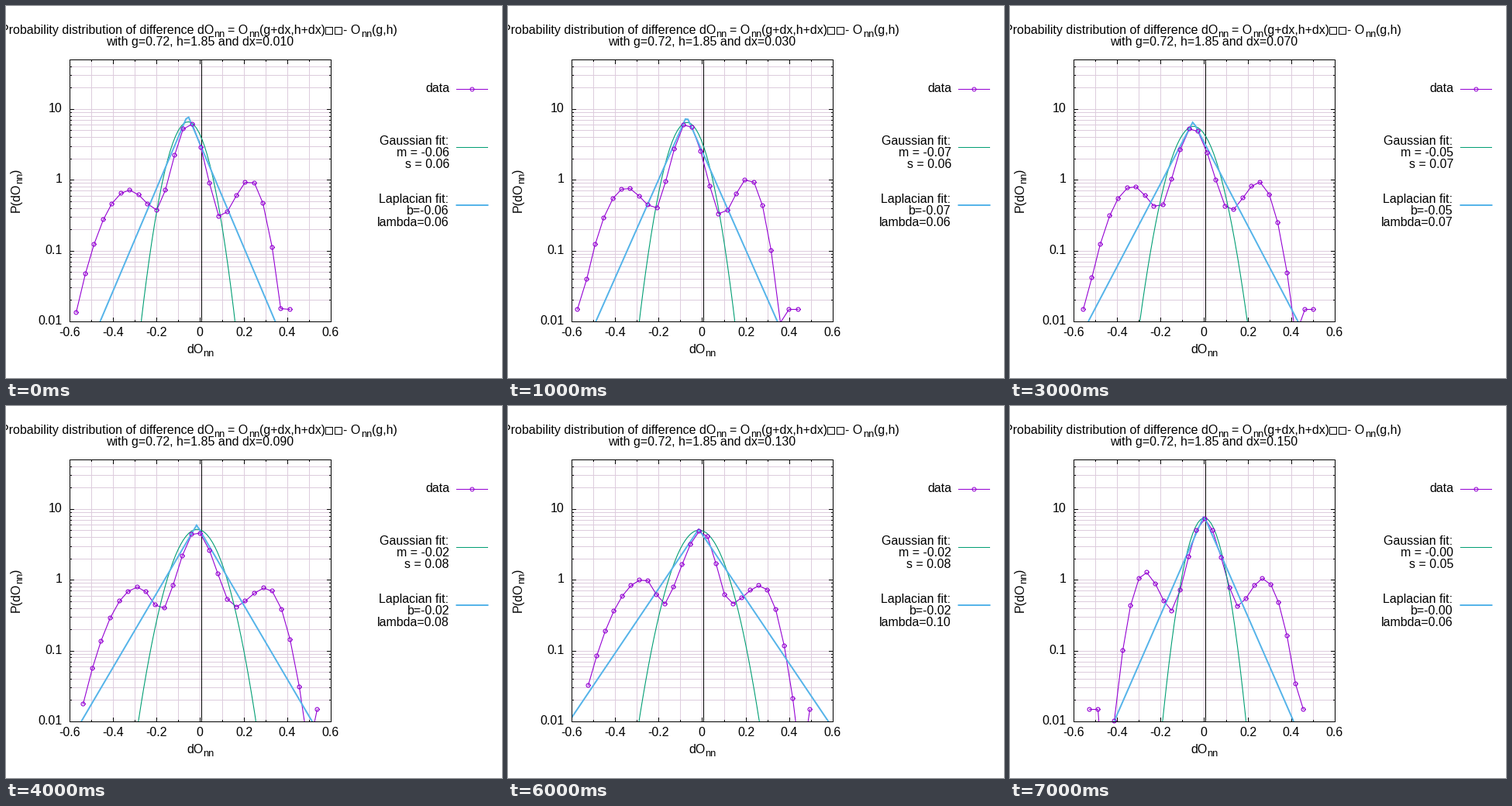
A matplotlib script for the animation above (8000 ms loop, 640 px wide and 480 px high).

```python
import numpy as np
import matplotlib.pyplot as plt
from matplotlib.animation import FuncAnimation
from matplotlib.patches import Rectangle

W, H, DPI = 640, 480, 100
LEFT, RIGHT, TOP, BOTTOM = 82, 419, 69, 407
PX = 72 / DPI
LONE = 391  # height of bins that hold a single count
PURPLE, GREEN, BLUE, GRID = "#9400d3", "#009e73", "#56b4e9", "#ddccdd"

plt.rcParams["font.family"] = "Liberation Sans"


def to_x(v):
    return LEFT + (np.asarray(v) + 0.6) * (RIGHT - LEFT) / 1.2


def to_y(p):
    scale = (BOTTOM - TOP) / np.log10(50 / 0.01)
    return BOTTOM - (np.log10(p) + 2) * scale


def fall(x, peak, low, k):
    """Drop from a peak to a low point; k = 0 is a parabola, 2 a smoothstep."""
    u = (x - peak[0]) / (low[0] - peak[0])
    return peak[1] + (low[1] - peak[1]) * u * u * (1 + k * (1 - u))


class Case:
    """fit: m, s, lambda; bins: first, step, count, lone bins left and right;
    keys: foot, peak, dip, peak, dip, peak, foot in stage pixels."""

    def __init__(self, fit, bins, keys):
        self.fit, self.bins = np.array(fit), np.array(bins)
        self.keys = np.array(keys)

    def between(self, other):
        return Case((self.fit + other.fit) / 2, (self.bins + other.bins) / 2,
                    (self.keys + other.keys) / 2)

    def points(self):
        first, step = self.bins[:2]
        count, lone_left, lone_right = np.ceil(self.bins[2:]).astype(int)
        x = np.round(first + step * np.arange(count))
        foot1, top1, dip1, top2, dip2, top3, foot2 = self.keys
        pieces = [fall(x, top1, foot1, 0), fall(x, top1, dip1, 2),
                  fall(x, top2, dip1, 1.3), fall(x, top2, dip2, 1.3),
                  fall(x, top3, dip2, 2), fall(x, top3, foot2, 0)]
        y = np.choose(np.searchsorted(self.keys[1:6, 0], x), pieces)
        y[:lone_left] = LONE
        y[count - lone_right:] = LONE
        return x, y


a = Case([-0.057, 0.0598, 0.0599], [90.3, 11.48, 25, 0, 1],
         [(90, 395), (159, 237), (196, 263), (236, 149), (275, 273),
          (314, 224), (354, 390)])
b = Case([-0.0851, 0.0622, 0.0651], [88, 11.27, 27, 1, 2],
         [(99, 373), (146, 231), (186, 261), (225, 151), (271, 271),
          (306, 219), (336, 325)])
c = Case([-0.0155, 0.0764, 0.083], [99, 11.63, 27, 0, 1],
         [(99, 384), (171, 233), (202, 264), (245, 161), (291, 260),
          (335, 234), (378, 362)])
d = Case([-0.026, 0.0528, 0.0546], [99, 10.85, 27, 2, 1],
         [(142, 317), (170, 216), (205, 266), (240, 144), (283, 265),
          (316, 224), (349, 295)])
e = Case([-0.0155, 0.0784, 0.0953], [103, 11, 27, 0, 1],
         [(110, 335), (176, 223), (202, 255), (250, 160), (284, 256),
          (326, 231), (358, 320)])
f = Case([-0.001, 0.0527, 0.0617], [102, 10.63, 27, 2, 1],
         [(134, 406), (174, 214), (210, 264), (250, 145), (292, 258),
          (326, 222), (367, 352)])
cases = [a, a.between(b), b, b.between(c), c, d, e, f]

# Whole coordinates are pixel centres.
fig = plt.figure(figsize=(W / DPI, H / DPI), dpi=DPI, facecolor="white")
ax = fig.add_axes([0, 0, 1, 1])
ax.set_xlim(-0.5, W - 0.5)
ax.set_ylim(H - 0.5, -0.5)
ax.axis("off")


def line(xs, ys, color="black", width=1, z=2):
    return ax.plot(xs, ys, color=color, lw=width * PX, zorder=z, snap=False,
                   solid_capstyle="projecting", solid_joinstyle="miter")[0]


def text(x, y, s, ha="left", size=16, rot=0):
    return ax.text(x - 0.5, y - 0.5, s, ha=ha, va="baseline",
                   fontsize=size * PX, rotation=rot, rotation_mode="anchor")


def sub(x, y, rot=0):
    text(x, y, "nn", size=12.8, rot=rot)


def rings(x, y):
    """Outline of a small circle round each point, as one broken path."""
    t = np.append(np.linspace(0, 2 * np.pi, 17), np.nan)
    return (np.add.outer(x, 2.5 * np.cos(t)).ravel(),
            np.add.outer(y, 2.5 * np.sin(t)).ravel())


def axes_box():
    for k in range(-6, 7):
        x = np.round(to_x(k / 10))
        size = 5 if k % 2 == 0 else 2
        line([x, x], [TOP, BOTTOM], GRID, z=1)
        line([x, x], [BOTTOM, BOTTOM - size])
        line([x, x], [TOP, TOP + size])
        if k % 2 == 0:
            text(x, 426, f"{k / 10:g}", "center")
    for decade in range(-2, 2):
        for k in range(1, 10):
            value = k * 10.0 ** decade
            if value > 50:
                break
            y = np.round(to_y(value))
            size = 5 if k == 1 else 2
            line([LEFT, RIGHT], [y, y], GRID, z=1)
            line([LEFT, LEFT + size], [y, y])
            line([RIGHT, RIGHT - size], [y, y])
            if k == 1:
                text(73, y + 4, f"{value:g}", "right")
    line([LEFT, RIGHT, RIGHT, LEFT, LEFT], [TOP, TOP, BOTTOM, BOTTOM, TOP], z=7)
    line([252, 252], [TOP, BOTTOM], z=3)


def captions():
    text(-7, 36, "Probability distribution of difference dO")
    text(286, 36, "= O")
    text(327, 36, "(g+dx,h+dx)")
    text(435, 36, "- O")
    text(472, 36, "(g,h)")
    for x in (268, 313, 458):
        sub(x, 40)
    for x in (412, 424):
        ax.add_patch(Rectangle((x, 27), 9, 9, fill=False, lw=PX, snap=False))
    text(233, 448, "dO")
    sub(254, 452)
    text(18, 266, "P(dO", rot=90)
    sub(21, 229, rot=90)
    text(18, 216, ")", rot=90)


def legend():
    text(572, 111, "data", "right")
    text(571, 179, "Gaussian fit:", "right")
    text(571, 254, "Laplacian fit:", "right")
    span = [581, 621]
    line(span, [107, 107], PURPLE)
    line(*rings([601], [107]), PURPLE)
    line(span, [182, 182], GREEN)
    line(span, [256.5, 256.5], BLUE, 2)


axes_box()
captions()
legend()

data = line([], [], PURPLE, 1.1, z=4)
gauss = line([], [], GREEN, 1.1, z=4.5)
laplace = line([], [], BLUE, 2, z=5)
marks = line([], [], PURPLE, 1.1, z=6)
window = Rectangle((LEFT - 0.5, TOP - 0.5), RIGHT - LEFT + 1, BOTTOM - TOP + 1,
                   transform=ax.transData)
for curve in (data, gauss, laplace):
    curve.set_clip_path(window)

subtitle = text(250, 51, "", "center")
labels = [text(572, y, "", "right") for y in (194, 209, 269, 284)]
formats = ["m = {:.2f}", "s = {:.2f}", "b={:.2f}", "lambda={:.2f}"]
grid = np.linspace(-0.6, 0.6, 100)


def draw(i):
    m, s, lam = cases[i].fit
    mid = m - 0.002
    x, y = cases[i].points()
    shown = y <= BOTTOM
    data.set_data(x, y)
    marks.set_data(*rings(x[shown], np.round(y[shown])))
    bell = np.exp(-((grid - m) / s) ** 2 / 2) / (s * np.sqrt(2 * np.pi))
    tent = np.exp(-np.abs(grid - mid) / lam) / (2 * lam)
    gauss.set_data(to_x(grid), to_y(bell))
    laplace.set_data(to_x(grid), to_y(tent))
    subtitle.set_text(f"with g=0.72, h=1.85 and dx={0.01 + 0.02 * i:.3f}")
    for label, fmt, v in zip(labels, formats, (m, s, mid, lam)):
        label.set_text(fmt.format(v))
    return [data, marks, gauss, laplace, subtitle, *labels]


anim = FuncAnimation(fig, draw, frames=len(cases), interval=1000,
                     repeat=True, repeat_delay=0, blit=False)
plt.show()
```
